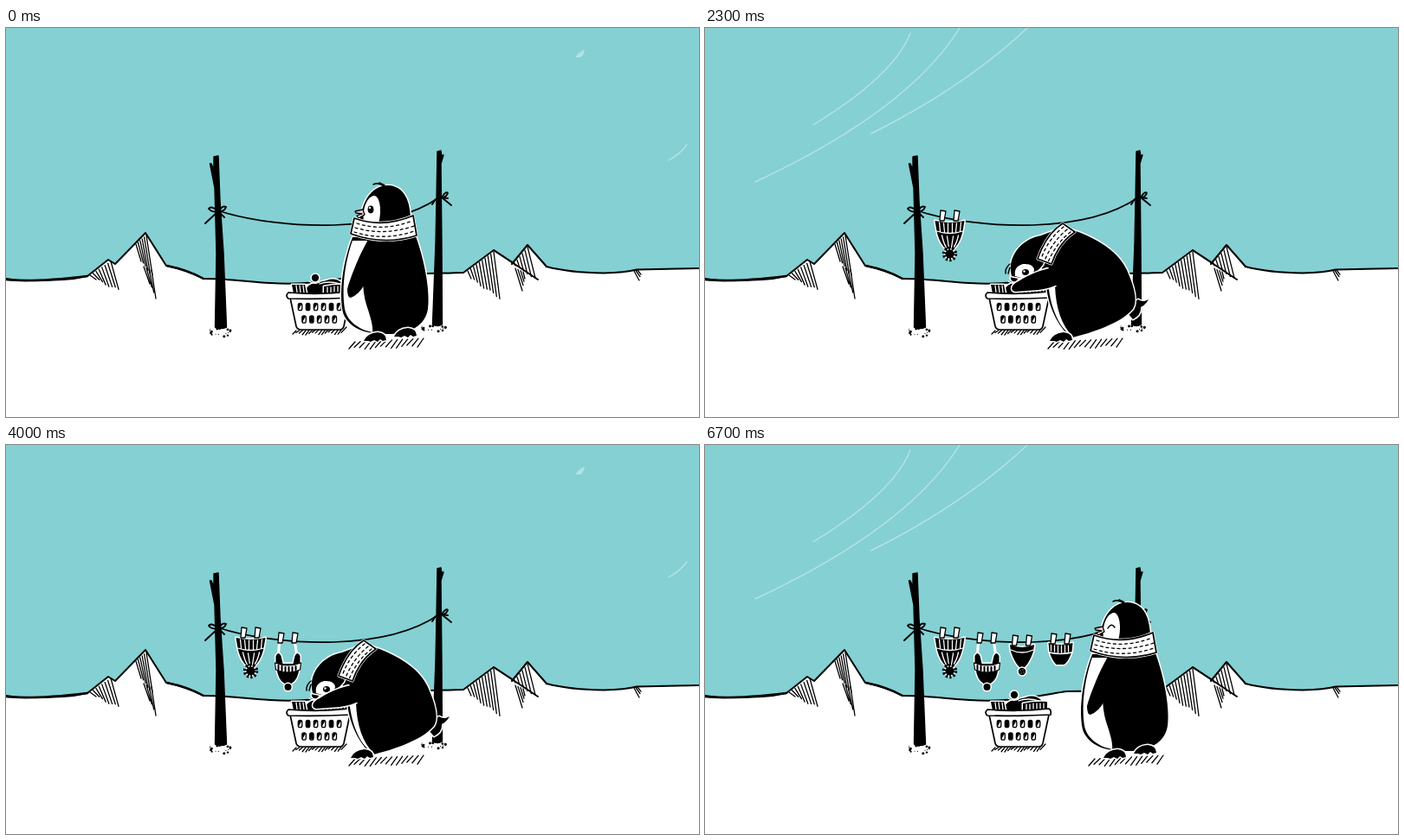
An HTML page for the animation above (6800 ms loop, 800 px wide and 450 px high).

```html
<!DOCTYPE html>
<html lang="en">
<head>
<meta charset="utf-8">
<title>Penguin laundry</title>
<style>
  html, body { margin: 0; width: 100%; height: 100%; overflow: hidden; background: #85d0d3; }
  svg { display: block; width: 100vw; height: 100vh; }
  path, circle, ellipse { stroke-linecap: round; stroke-linejoin: round; }
  .halo { fill: #000; stroke: #fff; stroke-width: 3; paint-order: stroke; }
  .ink { fill: none; stroke: #000; stroke-width: 1.5; }
  .fine { fill: none; stroke: #000; stroke-width: 1.3; }
  .post { stroke: #000; stroke-width: 1.4; }
  .chalk { fill: none; stroke: #fff; stroke-width: 1.3; }
  .paper { fill: #fff; stroke: #000; stroke-width: 1.7; }
  .white { fill: #fff; }
  .beak { fill: #f2cfcd; stroke: #000; stroke-width: 1.3; }
  .knit { fill: none; stroke: #000; stroke-width: 1.3; stroke-dasharray: 3 3.6; }
  .gust { fill: #fff; opacity: .38; }
  .breeze { fill: none; stroke: #fff; stroke-width: 1.4; opacity: .4; }
</style>
</head>
<body>
<svg viewBox="0 0 800 450">
  <defs>
    <path id="peg" class="paper" style="stroke-width:1.3" d="M-2 -11 L4 -10 L2 1 L-3 1Z"/>
    <g id="hat1">
      <path class="halo" d="M-17 1 Q0 5 17 1 L15 13 L14 17 Q11 28 4 34 H-4 Q-11 28 -14 17 L-15 13Z"/>
      <path class="chalk" d="M-15 13 Q0 18 15 13 M-12 3 L-11 13 M-7 4 L-6 14 M-2 4 V15 M3 4 V15 M8 4 L7 14 M13 3 L12 13 M-9 18 Q-7 27 -4 32 M-3 19 L-1 32 M4 19 L2 32 M10 18 Q8 27 5 31"/>
      <circle cy="39.5" r="5" class="halo"/>
      <circle cy="39.5" r="6.4" fill="none" stroke="#000" stroke-width="4.6" stroke-dasharray="2 2" style="stroke-linecap:butt"/>
    </g>
    <g id="hat2">
      <path d="M-10 0 L-11 14 M8 0 L10 14" fill="none" stroke="#fff" stroke-width="3"/>
      <path class="halo" d="M-14 25 V16 Q-11 10 -8 16 L-6 25 H6 L8 16 Q11 10 14 16 V25 L12 36 Q9 48 0 49 Q-9 48 -12 36Z"/>
      <path class="paper" style="stroke-width:1.2" d="M-15 24 Q0 30 15 24 L14 32 Q0 38 -14 32Z"/>
      <path class="ink" style="stroke-width:2.1" d="M-11 27 v5 M-7 28 v5 M-3 29 v5 M1 29 v5 M5 29 v5 M9 28 v4"/>
      <circle class="halo" cy="52" r="4"/>
    </g>
    <g id="hat3">
      <path class="halo" d="M-14 0 Q0 6 14 0 L13 8 Q7 25 0 28 Q-7 25 -13 8Z"/>
      <path class="chalk" d="M-13 6 Q0 12 13 6"/>
      <circle class="halo" cy="31" r="4.2"/>
      <path class="chalk" style="stroke-width:1" d="M-2 30 h.1 M1 29 h.1 M2 32 h.1 M-1 33 h.1"/>
    </g>
    <g id="hat4">
      <path class="halo" d="M-14 0 Q0 4 14 0 L13 10 Q9 22 4 25 H-5 Q-10 20 -13 10Z"/>
      <path class="chalk" d="M-11 2 v7 M-7 3 v7 M-3 3 v8 M1 3 v8 M5 3 v8 M9 3 v7 M-13 11 Q0 14 13 11"/>
    </g>
    <path id="foot" class="halo" d="M-13 5 Q-9 -4 3 -5 Q13 -4 13 4 L9 5 L6 3 L3 6 L-1 4 L-5 6 L-8 5Z"/>
    <path id="belly" class="white" d="M400 246 L417 246 C411 275 410 300 416 320 C421 335 424 345 423 352 C408 349 394 340 391 325 C387 300 392 268 400 246Z"/>
  </defs>

  <!-- land -->
  <path d="M583 274 L602 251 L624 276 L640 300 H580Z" class="paper"/>
  <path class="white" stroke="#000" stroke-width="2" d="M-5 289 C20 294 55 292 78 290 L94 287 L118 268 L126 273 L161 237 L185 275 Q210 280 228 290 C260 290 280 294 305 295 C350 298 380 291 417 285 Q470 285 528 283 L563 257 L598 280 L624 276 Q650 283 690 283.5 Q715 283 728 279.5 L805 278 V455 H-5Z"/>
  <path class="white" d="M586 273 L602 252 L623 276 L622 284 H598Z"/>
  <path class="ink" style="stroke-width:2" d="M563 257 L614 291 M584 273 L602 251 L624 276"/>
  <path class="ink" d="M0 291 C25 294 60 291 94 287" style="stroke-width:2.6"/>
  <path class="ink" d="M186 275 Q210 280 228 290" style="stroke-width:2.4"/>
  <g id="hatching" class="fine"></g>

  <!-- clothes line -->
  <path class="post" d="M240 149 L245 148 L247 200 L251 260 L254.500 346 Q248 349 241.500 346 L243 260 L241 185 L235.500 157 L237 157 L240 164Z"/>
  <path class="post" d="M498 143 L502 142 L503 148 L505 147 L502 157 L503 250 L503.500 343 Q498 346 492.500 343 L496 250 L497 200Z"/>
  <g id="dirt"></g>
  <path class="ink" style="stroke-width:1.7" d="M247 212 C320 234 440 238 500 196"/>
  <path class="ink" style="stroke-width:1.9" d="M230 226 L245 212 Q237 205 234 209 Q238 214 246 212 Q249 205 254 207 Q252 213 245 212 L252 219 M503 196 Q508 188 510 191 Q508 196 503 196 L514 205 M503 196 L510 197 M496 198 L492 204"/>

  <!-- wind -->
  <g data-on="wind0">
    <path class="gust" d="M657 34 Q661 28 668 25 Q667 32 663 34Z"/>
    <path class="breeze" d="M765 153 Q778 146 786 135"/>
  </g>
  <g data-on="wind1" transform="translate(300 -45)"><g id="gusts" class="gust">
    <path d="M93 209 Q162 203 203 161 L204 164 Q168 208 93 209Z"/>
    <path d="M40 237 C130 231 215 204 268 153 L270 159 C225 215 110 243 40 237Z"/>
    <path d="M163 202 C205 190 245 172 281 141 L283 143 C255 177 210 198 163 202Z"/>
  </g></g>
  <use href="#gusts" data-on="wind2"/>
  <path data-on="wind3" class="breeze" d="M58 178 Q235 95 294 0 M125 112 Q218 55 237 6 M192 122 Q300 68 372 0"/>

  <g id="hung"></g>

  <!-- basket -->
  <path class="halo" d="M344 307 Q346 299 353 296 Q362 294 370 292 Q380 288 388 295 V307Z"/>
  <circle class="halo" cx="357" cy="289" r="4.2"/>
  <path class="halo" d="M330 297 H345 L347 307 H332Z M367 299 Q380 296 395 297 V307 H367Z"/>
  <path class="chalk" d="M335 298 l1 8 M339 298 l1 8 M343 298 l1 8 M350 293 q6 4 12 1 M362 296 q10 -4 24 0 M371 300 v6 M375 300 v6 M379 299 v6 M383 299 v6 M387 299 v6 M391 299 v6"/>
  <path class="paper" d="M328 312 L335 345 Q336 349 341 349 H385 Q389 349 390 345 L397 312Z"/>
  <path class="paper" d="M326 306 Q361 309 397 305 Q400 306 399 312 Q361 314 326 313 Q322 310 326 306Z"/>
  <g id="holes"></g>

  <!-- penguin -->
  <g id="penguin">
    <g data-on="side lean" class="fine shade"></g>

    <g data-on="side">
      <path class="halo" d="M400 242 C387 275 384 315 390 332 C398 348 415 354 437 354 C465 355 484 345 487 325 C490 300 481 262 472 238Z"/>
      <use href="#belly"/>
      <path data-on="down" d="M417 247 C408 262 397 290 394 302 Q394 312 398 312 Q408 308 414 296 L426 270Z"/>
      <g data-on="up">
        <g transform="translate(379 261) scale(.77 .97)"><use class="held"/></g>
        <path class="halo" d="M418 252 Q408 260 394 253 Q386 246 379 255 Q376 262 384 262 Q392 264 397 274 Q406 285 418 284Z"/>
        <path d="M411 255 L430 246 V288 L412 284Z"/>
      </g>
      <path class="halo" d="M408 230 C410 196 425 182 441 182 C460 183 467 200 467 224Z"/>
      <path class="ink" d="M436 183 Q430 178 424 181 M437 182 L431 179"/>
      <path class="white" d="M413 224 C411 208 417 195 425 194 C432 195 434 212 430 226Z"/>
      <path class="beak" d="M403 212 L412 210 L414 216 L407 220 L405 217 L411 215 L404 214Z"/>
      <g data-on="open"><ellipse cx="421" cy="210" rx="3.4" ry="4.4"/><circle cx="420" cy="208" r="1.2" class="white"/></g>
      <path data-on="smile" class="ink" d="M418 212 Q422 205 426 211"/>
      <path class="halo" d="M402 220 Q435 232 470 217 L474 240 Q436 252 398 238Z"/>
      <path class="paper" d="M402 220 Q435 232 470 217 L474 240 Q436 252 398 238Z"/>
      <path class="knit" d="M405 226 Q436 236 469 223 M403 231 Q436 241 471 229 M402 236 Q436 247 471 235"/>
    </g>

    <g data-on="lean">
      <path class="halo" d="M430 231 C460 240 478 262 484 285 C492 315 488 343 470 350 C445 355 415 354 404 345 C392 332 387 310 390 290Z"/>
      <path class="white" d="M392 298 L411 291 C411 310 426 322 426 351 C408 350 392 330 392 298Z"/>
      <path class="halo" d="M414 272 C395 280 372 290 364 297 C359 303 364 306 371 305 C392 302 408 296 416 289Z"/>
      <path d="M408 272 L430 255 V300 L411 293Z"/>
      <path class="halo" d="M371 258 C362 238 370 214 390 211 C406 209 418 215 426 221 L382 264Z"/>
      <path class="white" d="M370 252 C368 240 372 234 379 235 Q387 239 386 252 L380 260Z"/>
      <ellipse cx="378" cy="244" rx="3.6" ry="4.2"/><circle cx="376.5" cy="243" r="1.2" class="white"/>
      <path class="beak" d="M370 258 L378 256 L380 261 L374 265Z"/>
      <path class="halo" d="M426 213 L438 223 Q404 242 388 276 L375 268 Q390 232 426 213Z"/>
      <path class="paper" d="M426 213 L438 223 Q404 242 388 276 L375 268 Q390 232 426 213Z"/>
      <path class="knit" d="M425 217 Q394 236 380 267 M429 220 Q399 239 384 270 M433 223 Q402 242 387 272"/>
    </g>

    <g data-on="side lean">
      <use href="#foot" x="426" y="357"/>
      <use href="#foot" x="461" y="352"/>
    </g>

    <g data-on="bend">
      <g class="fine shade"></g>
      <path class="halo" d="M489 331 Q491 318 500 314 Q506 318 512 314 Q509 320 503 323 Q504 332 494 337Z"/>
      <path class="halo" d="M413 230 C438 237 474 252 487 280 C495 298 500 315 494 325 C480 342 445 353 424 358 C412 352 396 325 394 298 L386 268Z"/>
      <path class="white" d="M396.500 298 L404 298 C405 325 412 344 424 356 C411 350 399 326 396.500 298Z"/>
      <use href="#foot" x="411" y="357"/>
      <path class="halo" d="M354 287 C348 265 365 244 388 240 L404 234 L390 274 L375 291Z"/>
      <path class="ink" d="M352 273 Q346 278 347 284 M352 277 L350 284"/>
      <path class="white" d="M358 287 Q356 276 367 273 Q380 272 380 281 L372 291Z"/>
      <ellipse cx="370" cy="282.500" rx="4" ry="3.6"/><circle cx="368.500" cy="281.500" r="1.2" class="white"/>
      <path class="halo" d="M410 276 C390 278 374 285 362 293 C353 297 352 304 358 305 L385 303 Q400 301 408 296Z"/>
      <path d="M396 276 L420 260 V305 L405 298Z"/>
      <path class="halo" d="M413 226 L427 236 Q408 249 400 273 L384 267 Q394 238 413 226Z"/>
      <path class="paper" d="M413 226 L427 236 Q408 249 400 273 L384 267 Q394 238 413 226Z"/>
      <path class="knit" d="M414 230 Q396 244 388 267 M418 233 Q401 247 392 269 M422 236 Q405 249 396 271"/>
    </g>

    <g data-on="back">
      <g class="fine shade" transform="translate(-66 1)"></g>
      <g data-on="up">
        <g transform="translate(309 258)"><use class="held"/></g>
        <path class="halo" d="M334 246 Q318 251 309 245 Q301 246 303 254 Q309 266 328 270Z"/>
      </g>
      <path data-on="reach" class="halo" d="M335 262 Q322 252 311 238 Q306 229 313 228 Q322 230 339 244Z"/>
      <path data-on="down" class="halo" d="M335 248 Q322 262 312 290 Q310 298 317 298 L332 292Z"/>
      <path class="halo" d="M335 240 C327 268 318 300 323 325 C328 347 350 355 372 355 C396 355 416 346 421 322 C423 295 415 262 408 240Z"/>
      <path d="M325 251 L340 245 V290 H325Z"/>
      <use href="#foot" x="347" y="357"/>
      <use href="#foot" x="396" y="357"/>
      <path class="halo" d="M341 226 C343 200 352 183 373 182 C394 183 402 205 402 232Z"/>
      <path class="ink" d="M372 183 Q362 180 357 181 M370 183 Q364 179 361 179"/>
      <path class="halo" d="M336 217 Q368 234 411 224 L408 247 Q366 253 331 238Z"/>
      <path class="paper" d="M336 217 Q368 234 411 224 L408 247 Q366 253 331 238Z"/>
      <path class="knit" d="M338 223 Q368 238 407 230 M336 229 Q368 243 407 236 M335 235 Q368 248 406 241"/>
    </g>
  </g>
</svg>
<script>
const $ = s => document.querySelector(s), $$ = s => [...document.querySelectorAll(s)];
const range = n => [...Array(n).keys()];

// n strokes running from segment a to segment b
function hatch(n, [ax, ay, bx, by], [cx, cy, dx, dy]) {
  const d = range(n).map(i => {
    const k = i / (n - 1), wob = Math.sin(i * 5) * 1.5;
    return `M${ax + (bx - ax) * k} ${ay + (by - ay) * k}L${cx + (dx - cx) * k} ${cy + (dy - cy) * k + wob}`;
  }).join('');
  return `<path d="${d}"/>`;
}
$('#hatching').innerHTML =
  hatch(8, [97, 286, 121, 270], [104, 291, 130, 303]) +
  hatch(6, [150, 250, 162, 240], [156, 270, 169, 286]) +
  hatch(4, [159, 276, 168, 280], [166, 296, 173, 312]) +
  hatch(10, [533, 281, 563, 259], [537, 290, 570, 312]) +
  hatch(6, [587, 272, 602, 253], [588, 275, 611, 289]) +
  hatch(4, [588, 278, 597, 282], [596, 304, 599, 289]) +
  hatch(3, [725, 281, 729, 280], [731, 292, 733, 286]) +
  hatch(16, [335, 350, 393, 346], [331, 354, 387, 353]);
$$('.shade').forEach(g => g.innerHTML = hatch(14, [403, 363, 482, 359], [396, 371, 475, 368]));

const dots = (cx, cy, w, h) => range(18).map(i => {
  const a = i * 2.4, r = .78 + .22 * Math.sin(i * 7);
  return `<circle cx="${cx + Math.cos(a) * w * r}" cy="${cy + Math.sin(a) * h * r}" r="${1 + .5 * Math.sin(i * 3)}"/>`;
}).join('');
$('#dirt').innerHTML = dots(247.5, 351, 14.5, 6) + dots(494, 347, 17, 4);

const hole = (x, y, full) => `<rect x="${x - 2.2}" y="${y - 4.2}" width="4.5" height="8.4" rx="2.2" class="paper" style="stroke-width:1.3"/>
  <path d="M${x - 2} ${y + 3.5}V${y - 3}Q${x} ${y - 5} ${x + 2} ${y - 3.5}${full ? `V${y + 3.5}` : ''}Z"/>`;
$('#holes').innerHTML = range(6).map(i => hole(339.5 + i * 9, 322.5, i % 3 == 1)).join('') +
  range(5).map(i => hole(344 + i * 8.8, 337, i == 1)).join('');

const spots = [[282.5, 222], [325.5, 228], [366, 231], [410.5, 229]];
$('#hung').innerHTML = spots.map(([x, y], i) => `<g transform="translate(${x} ${y})">
  <use href="#hat${i + 1}"/><use href="#peg" x="-8.5"/><use href="#peg" x="7.5"/></g>`).join('');

// tick, visible parts, offset, hat in hand, hats on the line, mirrored
const acts = [
  [0, 'side down open', 0, 0, 0], [3, 'lean', 0, 0, 0], [4, 'bend', 0, 0, 0], [6, 'lean', 0, 0, 0],
  [7, 'side up open', 0, 1, 0], [10, 'side up open', -25, 1, 0], [11, 'side up open', -50, 1, 0],
  [12, 'back up', -20, 1, 0], [14, 'back reach', -30, 0, 1], [16, 'back down', -20, 0, 1],
  [17, 'back down', 0, 0, 1, 1], [19, 'back down', 30, 0, 1, 1], [20, 'back down', 60, 0, 1, 1],
  [21, 'side down open', 0, 0, 1], [22, 'lean', 0, 0, 1], [23, 'bend', 0, 0, 1], [25, 'lean', 0, 0, 1],
  [26, 'side up open', 0, 2, 1], [27, 'back up', 30, 2, 1], [28, 'back up', 0, 2, 1],
  [29, 'back reach', 12, 0, 2], [32, 'back down', 12, 0, 2], [33, 'back down', 30, 0, 2, 1],
  [35, 'back down', 60, 0, 2, 1], [36, 'side down open', 0, 0, 2], [38, 'lean', 0, 0, 2], [39, 'bend', 0, 0, 2],
  [41, 'lean', 0, 0, 2], [42, 'side up open', 0, 3, 2], [43, 'back up', 60, 3, 2],
  [45, 'back reach', 54, 0, 3], [47, 'back down', 60, 0, 3, 1], [49, 'side down open', 0, 0, 3],
  [50, 'lean', 0, 0, 3], [51, 'bend', 0, 0, 3], [53, 'side up open', 0, 4, 3], [54, 'side up open', 25, 4, 3],
  [55, 'back up', 100, 4, 3], [57, 'back reach', 98, 0, 4], [59, 'back down', 105, 0, 4],
  [61, 'side down open', 47, 0, 4], [63, 'side down smile', 47, 0, 4]
];
const parts = $$('[data-on]'), held = $$('.held'), hung = [...$('#hung').children];

function draw(tick) {
  const [, tags, dx, hat, count, mirrored] = acts.findLast(a => a[0] <= tick);
  const shown = [...tags.split(' '), 'wind' + tick % 4];
  for (const p of parts)
    p.style.display = p.dataset.on.split(' ').some(t => shown.includes(t)) ? '' : 'none';
  hung.forEach((g, i) => g.style.display = i < count ? '' : 'none');
  for (const u of held) {
    u.setAttribute('href', '#hat' + hat);
    u.setAttribute('transform', hat == 2 ? 'translate(-2 43) scale(1 -1)' : '');
  }
  $('#penguin').setAttribute('transform', mirrored ? `translate(${729 + dx} 0) scale(-1 1)` : `translate(${dx} 0)`);
}

const start = performance.now();
let last = -1;
function loop() {
  const tick = Math.floor((performance.now() - start) % 6800 / 100);
  if (tick != last) draw(last = tick);
  requestAnimationFrame(loop);
}
loop();
</script>
</body>
</html>
```
